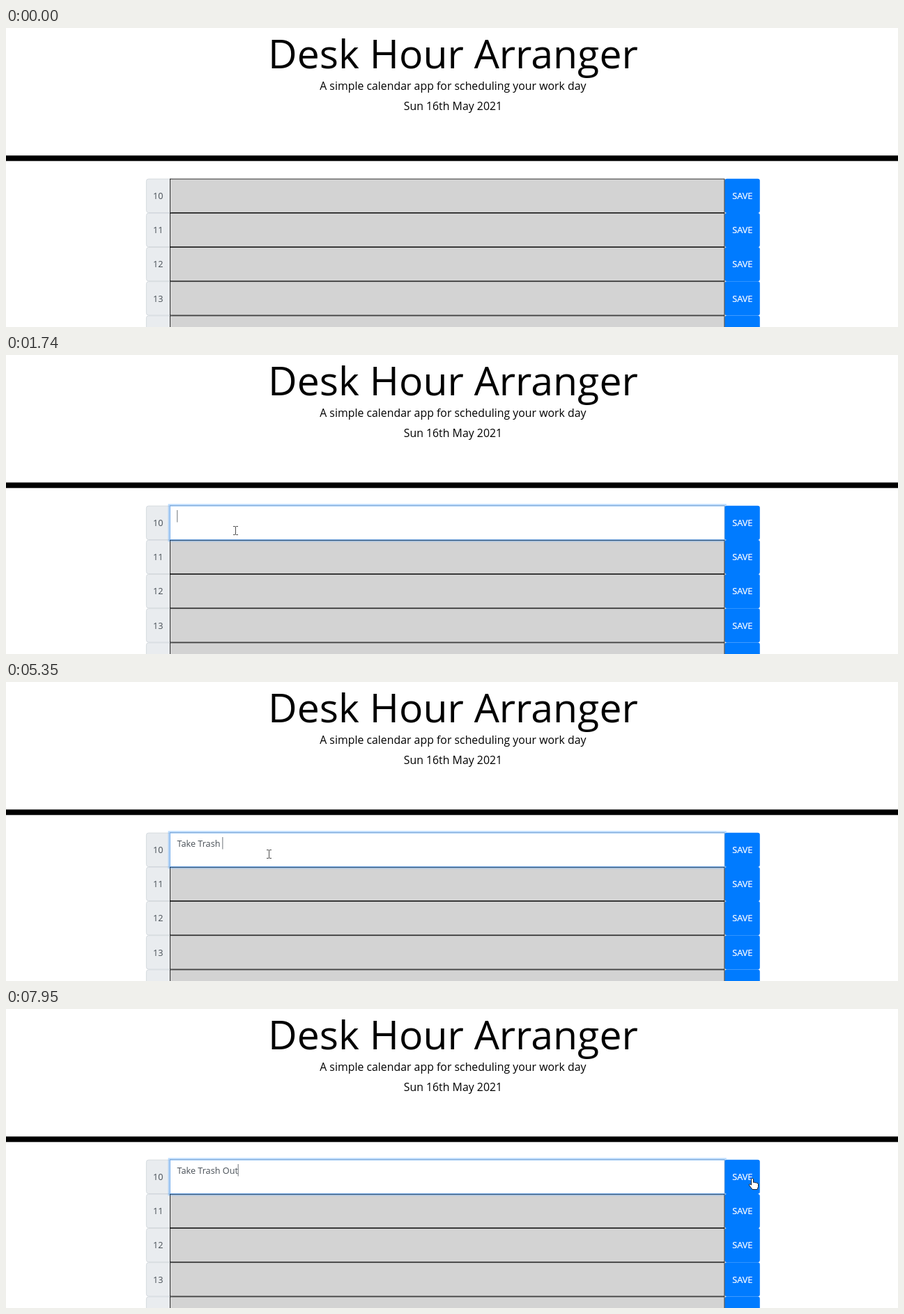
Recreate the animation shown at these times as an HTML page. Size 1280x430 px, loop 8 s.

```html
<!DOCTYPE html>
<html lang="en">
<head>
<meta charset="utf-8">
<title>Day planner</title>
<style>
  html, body { margin: 0; width: 100%; height: 100%; overflow: hidden; background: #fff; }
  svg { display: block; width: 1280px; height: 430px; }
  text { font: 16px "Open Sans", sans-serif; fill: #495057; white-space: pre; }
  .mid { text-anchor: middle; }
  .head { font-size: 20px; fill: #000; }
  .title { font-size: 72px; fill: #000; }
  .save { fill: #fff; stroke: #fff; stroke-width: .3; }
</style>
</head>
<body>
<svg viewBox="0 0 1280 430">
  <!-- page at its own size, origin at the top left of the first row -->
  <g transform="translate(201 216.7) scale(.7935)">
    <text class="mid title" x="555" y="-200">Desk Hour Arranger</text>
    <text class="mid head" x="555" y="-161">A simple calendar app for scheduling your work day</text>
    <text class="mid head" x="555" y="-125">Sun 16th May 2021</text>
    <rect x="-300" y="-42" width="1700" height="10"/>
    <g id="rows"></g>
    <g id="focus">
      <rect id="glow" fill="#007bff"/>
      <rect id="field" x="43.5" y=".5" width="1002.5" height="61" fill="#fff"/>
      <text id="entry" x="56" y="25">Take Trash Out</text>
      <rect id="caret" y="8" width="1" height="22" fill="#495057"/>
    </g>
  </g>
  <path id="beam" d="M-3.5-6h2.5l1 .6l1-.6h2.5M-3.5 6h2.5l1-.6l1 .6h2.5M0-5.5v11" fill="none" stroke="#222" stroke-width=".8"/>
  <path id="hand" d="M-1.5 1Q0-1 1.5 1V6Q3 5 4.2 6.4Q5.6 5.5 6.5 7Q8.4 6.4 8.5 8.5V12L7 16H0L-4.8 9.5Q-4.6 7.3-1.5 9.5Z"
        fill="#fff" stroke="#000" stroke-width=".8" stroke-linejoin="round"/>
  <circle id="ring" cx="328" cy="251.5" r="9.5" fill="#ff0"/>
</svg>
<script>
const LOOP = 8000, ENTER = 330, FOCUS = 1350, BLINK = 515, STEP = 70;
const $ = id => document.getElementById(id);
const set = (id, attrs) => { for (const k in attrs) $(id).setAttribute(k, attrs[k]); };
const show = (id, on) => set(id, { visibility: on ? "inherit" : "hidden" });
const clamp = v => Math.max(0, Math.min(1, v));
const smooth = u => u * u * u * (10 - 15 * u + 6 * u * u);

$("rows").innerHTML = [0, 1, 2, 3, 4].map(i => `<g transform="translate(0 ${62 * i})">
  <rect x=".5" y=".5" width="50" height="61" rx="4" fill="#e9ecef" stroke="#ced4da"/>
  <text class="mid" x="21.7" y="37">${10 + i}</text>
  <rect x="1046.5" width="63.5" height="62" rx="4" fill="#007bff"/>
  <rect x="43.5" y=".5" width="1002.5" height="61" fill="#d3d3d3" stroke="#000"/>
  <text class="mid save" x="1078.5" y="37">SAVE</text></g>`).join("");

const message = $("entry").textContent;
const widths = [...message, ""].map((_, n) => n && $("entry").getSubStringLength(0, n));

// each word is typed at an even pace between its first and last key
const words = [
  { text: "Take ", start: 3550, end: 4280 },
  { text: "Trash ", start: 4480, end: 5350 },
  { text: "Out", start: 6000, end: 6550 }];

const moves = [
  { start: ENTER, end: 1050, x: 329.5, y: 252.5, bow: 0 },
  { start: 1680, end: 1820, x: 377.5, y: 247.5, bow: 0 },
  { start: 6930, end: 7910, x: 1071, y: 243.5, bow: 48 }];

function typing(t) {
  let count = 0, last = FOCUS;
  for (const { text, start, end } of words) {
    if (t < start) break;
    const gap = (end - start) / (text.length - 1);
    const n = Math.min(text.length - 1, Math.floor((t - start) / gap));
    count += n + 1;
    last = start + n * gap;
  }
  return { count, caretOn: Math.floor((t - last) / BLINK) % 2 === 0 };
}

function pointer(t) {
  let x = 1015, y = 424;
  for (const m of moves) {
    const u = clamp((t - m.start) / (m.end - m.start)), k = smooth(u);
    x += (m.x - x) * k;
    y += (m.y - y) * k + m.bow * Math.sin(Math.PI * u);
  }
  return [x, y];
}

function draw(t) {
  const focused = t >= FOCUS;
  show("focus", focused);
  if (focused) {
    const p = smooth(clamp((t - FOCUS) / 150)), s = 3.2 * p;
    set("glow", { x: 43 - s, y: -s, width: 1003.5 + 2 * s, height: 62 + 2 * s, opacity: .25 * p });
    set("field", { stroke: `rgb(${128 * p},${189 * p},${255 * p})` });
    const { count, caretOn } = typing(t);
    $("entry").textContent = message.slice(0, count);
    set("caret", { x: Math.floor(56 + widths[count]) });
    show("caret", caretOn);
  }

  show("ring", t >= 1150 && t < 1600);
  set("ring", { opacity: .5 * clamp((1600 - t) / 150) });

  const [x, y] = pointer(Math.floor(t / STEP) * STEP), onButton = x > 1032;
  show("beam", t >= ENTER && !onButton);
  show("hand", t >= ENTER && onButton);
  set(onButton ? "hand" : "beam", { transform: `translate(${x} ${y})` });
}

(function tick() {
  draw(performance.now() % LOOP);
  requestAnimationFrame(tick);
})();
</script>
</body>
</html>
```
